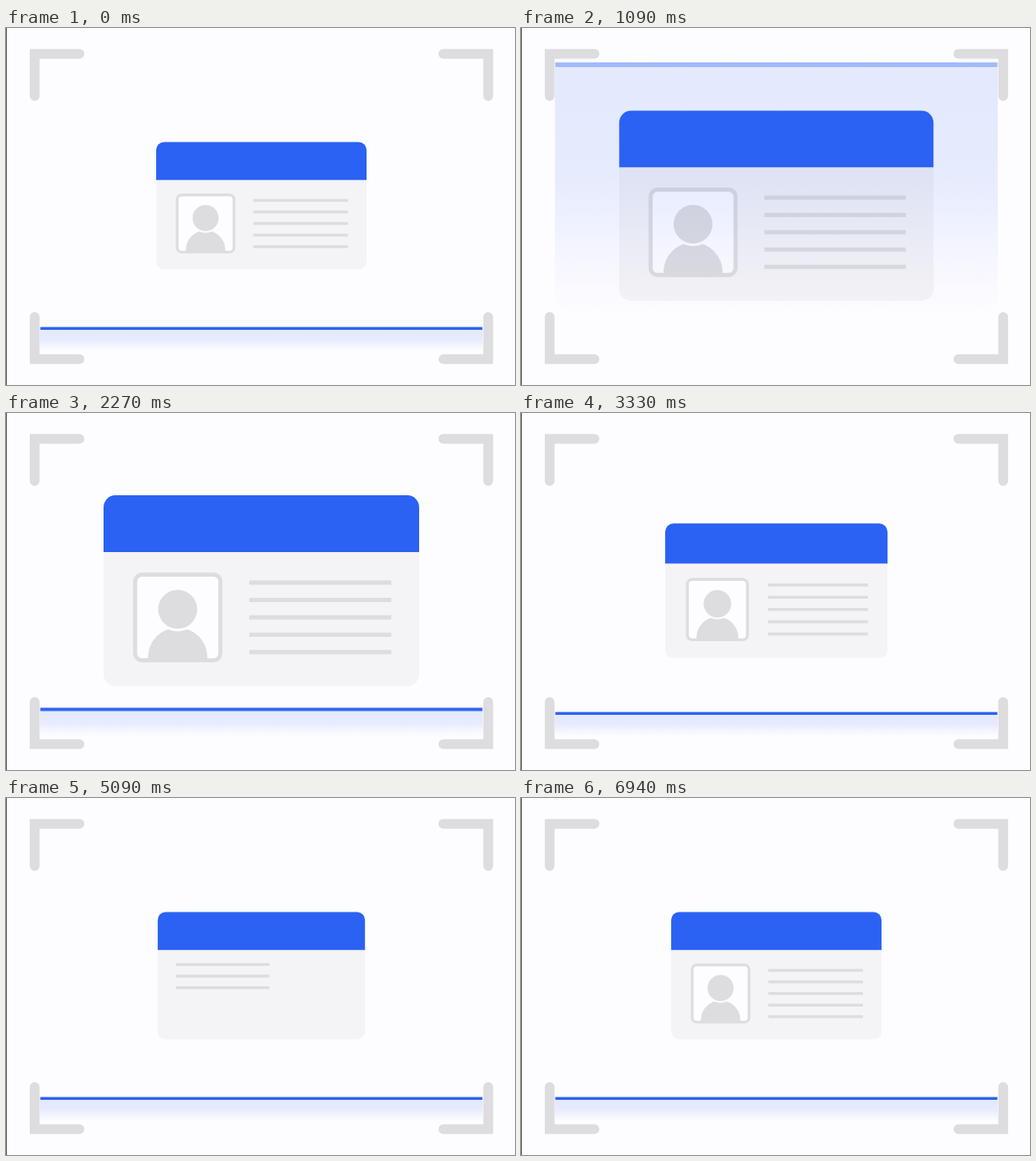
Write an HTML page with a canvas that moves like this. It is 600 by 421 pixels and loops after 7 s.

```html
<!DOCTYPE html>
<html lang="en">
<head>
<meta charset="utf-8">
<title>Card scan</title>
<style>
  html, body { margin: 0; width: 100%; height: 100%; overflow: hidden; background: #fdfcff; }
  canvas { display: block; }
</style>
</head>
<body>
<canvas id="stage" width="600" height="421"></canvas>
<script>
const ctx = document.getElementById('stage').getContext('2d');
const LOOP = 7000;
const BG = '#fdfcff', BLUE = '#2b62f3', GREY = '#dddcde', BODY = '#f4f3f5';
const CX = 301, CY = 209.6;

// Critically damped spring from 0 to 1.
function spring(t, start, rate) {
  const x = Math.max(0, t - start) / 1000 * rate;
  return 1 - (1 + x) * Math.exp(-x);
}

const lift = t => spring(t, 315, 8.2) - spring(t, 1600, 9.2);
const zoom = t => spring(t, 310, 8.2) - spring(t, 2840, 7.6);
const turn = t => Math.PI * (spring(t, 4200, 5.2) - spring(t, 5540, 5.2));

function rect(x, y, w, h, color) {
  ctx.fillStyle = color;
  ctx.fillRect(x, y, w, h);
}

function rounded(x, y, w, h, r) {
  ctx.beginPath();
  ctx.roundRect(x, y, w, h, r);
}

function disc(x, y, r, color) {
  ctx.fillStyle = color;
  ctx.beginPath();
  ctx.arc(x, y, r, 0, 2 * Math.PI);
  ctx.fill();
}

function lines(x, y, w, count) {
  for (let i = 0; i < count; i++) rect(x, y + i * 20.5 - 2.5, w, 5, GREY);
}

function portrait() {
  rounded(-148.8, -19, 100.5, 101, 8);
  ctx.fillStyle = BG;
  ctx.fill();

  ctx.save();
  ctx.beginPath();
  ctx.rect(-146, -18, 95, 99);
  ctx.clip();
  disc(-98.6, 78.5, 35, GREY);
  disc(-98.6, 21.9, 26, BG);
  disc(-98.6, 21.9, 23, GREY);
  ctx.restore();

  rounded(-148.8, -19, 100.5, 101, 8);
  ctx.strokeStyle = GREY;
  ctx.lineWidth = 4.8;
  ctx.stroke();
}

function card(t) {
  const scale = (2 + zoom(t)) / 3;
  const side = Math.cos(turn(t));
  ctx.save();
  ctx.translate(CX, CY);
  ctx.scale(scale * Math.max(Math.abs(side), 0.002), scale);
  rounded(-186, -112.5, 372, 225, 14);
  ctx.fillStyle = BODY;
  ctx.fill();
  rounded(-186, -112.5, 372, 67, [14, 14, 0, 0]);
  ctx.fillStyle = BLUE;
  ctx.fill();
  if (side >= 0) {
    portrait();
    lines(-14.2, -9.6, 167.4, 5);
  } else {
    lines(-153.5, -19.8, 168, 3);
  }
  ctx.restore();
}

function beam(t) {
  const h = Math.max(0, lift(t));
  const speed = Math.abs(lift(t + 8) - lift(t - 8)) * 315 / 16;
  const y = 354.3 - 315 * h;
  const thick = 3.3 + 1.7 * h + 15 * speed;
  const top = y - thick / 2, bottom = y + thick / 2;
  const end = 381 - 46 * h * h;

  const glow = ctx.createLinearGradient(0, bottom, 0, end);
  const tint = a => `rgba(43,98,243,${a})`;
  glow.addColorStop(0, tint(0.12));
  glow.addColorStop(0.45, tint(0.11));
  glow.addColorStop(0.75, tint(0.045));
  glow.addColorStop(1, tint(0));
  rect(40, top, 522, end - top, glow);

  ctx.globalAlpha = 1 - 0.65 * Math.pow(h, 0.7);
  rect(40.5, top, 521, thick, BLUE);
  ctx.globalAlpha = Math.min(1, speed * 1.5);
  rect(40.5, top, 521, 1.2, BLUE);
  ctx.globalAlpha = 1;
}

function corner(x, y, dx, dy) {
  ctx.beginPath();
  ctx.moveTo(x, y + dy * 49.8);
  ctx.lineTo(x, y);
  ctx.lineTo(x + dx * 52.8, y);
  ctx.stroke();
}

function corners() {
  ctx.strokeStyle = GREY;
  ctx.lineWidth = 11.5;
  ctx.lineCap = 'round';
  ctx.lineJoin = 'miter';
  corner(33.8, 30.4, 1, 1);
  corner(568.4, 30.4, -1, 1);
  corner(33.8, 390.5, 1, -1);
  corner(568.4, 390.5, -1, -1);
}

function draw(t) {
  rect(0, 0, 600, 421, BG);
  card(t);
  beam(t);
  corners();
  rect(0, 0, 1, 421, '#555557');
}

let begin;
function tick(now) {
  begin ??= now;
  draw((now - begin) % LOOP);
  requestAnimationFrame(tick);
}
draw(0);
requestAnimationFrame(tick);
</script>
</body>
</html>
```
